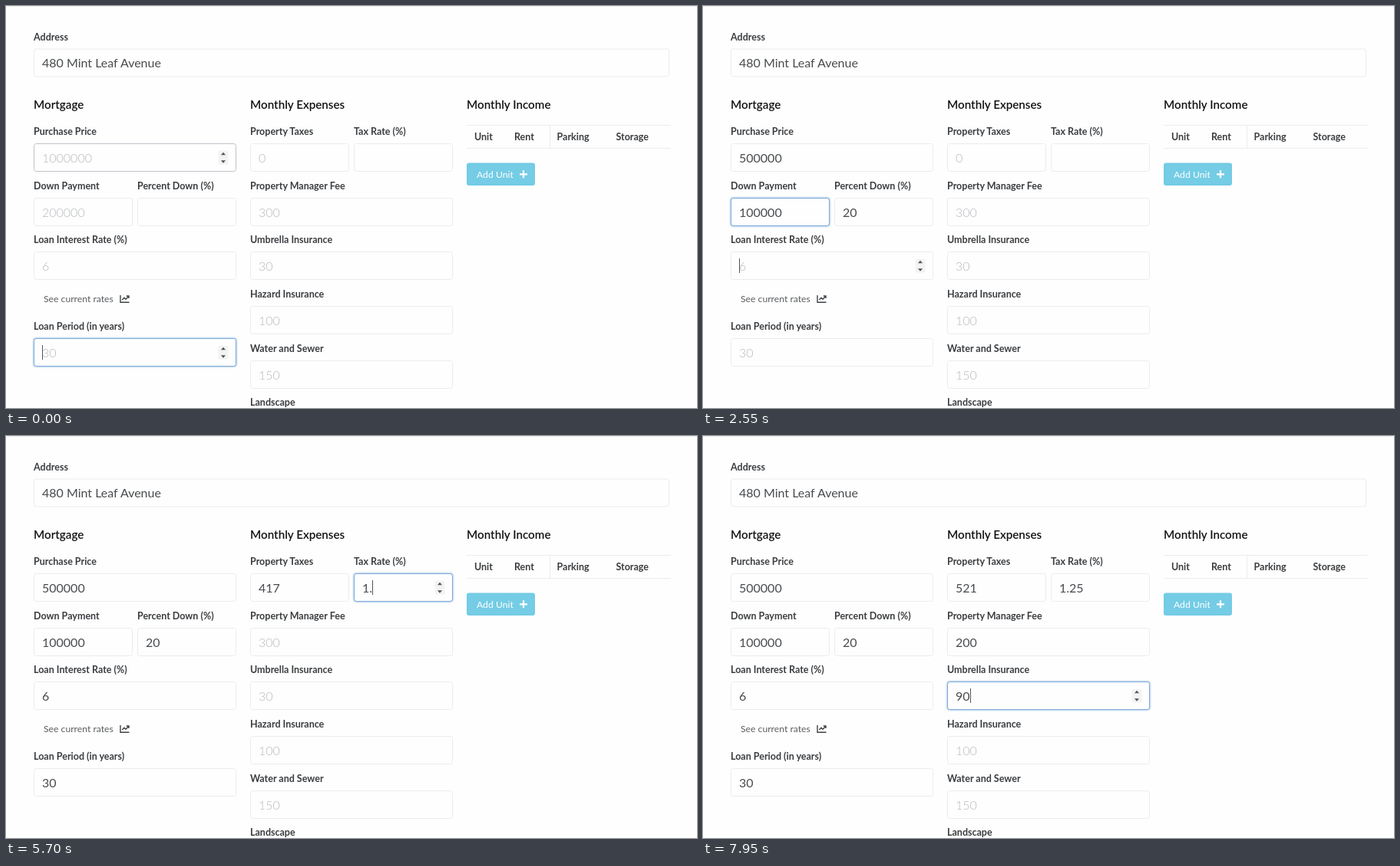
An HTML page that plays this animation: 900 px wide and 524 px high, repeating every 8 s.

```html
<!DOCTYPE html>
<html lang="en">
<head>
<meta charset="utf-8">
<title>Rental calculator form</title>
<style>
  html, body { margin: 0; width: 100%; height: 100%; overflow: hidden; background: #fefefe; }
  svg { display: block; font-family: Lato, sans-serif; }
  .heading { font-size: 15.2px; font-weight: 600; fill: #111; }
  .label { font-size: 12.5px; font-weight: 700; fill: #3a3d40; }
  .link { font-size: 12.2px; fill: #5a5d60; }
  .value { font-size: 16px; fill: #484b4e; }
  .hint { font-size: 16px; font-weight: 300; fill: #b4b7ba; }
  .box { fill: #fefefe; stroke: #ebecec; }
  .ring { fill: none; stroke: #7da8d6; }
  .halo { fill: none; stroke: #b4d1ee; stroke-opacity: .6; stroke-width: 2; }
  .rule { fill: none; stroke: #ebecec; }
</style>
</head>
<body>
<svg id="stage" width="900" height="524" viewBox="0 0 900 524"></svg>
<script>
const DURATION = 8000, FADE = 150, BLINK = 500;
const stage = document.getElementById('stage');

function add(tag, attrs, parent = stage) {
  const node = document.createElementNS('http://www.w3.org/2000/svg', tag);
  for (const key in attrs) node.setAttribute(key, attrs[key]);
  return parent.appendChild(node);
}

function write(text, x, y, cls, parent) {
  const node = add('text', { x, y, class: cls }, parent);
  node.textContent = text;
  return node;
}

function makeField(label, x, y, w, hint = '', typed = '', keys = []) {
  write(label, x, y - 10.7, 'label');
  const box = { x: x + .5, y: y + .5, width: w - 1, height: 36, rx: 3 };
  const frame = add('rect', { ...box, class: 'box' });
  const ring = add('g', { opacity: 0 });
  add('rect', { x: x - .5, y: y - .5, width: w + 1, height: 38, rx: 4, class: 'halo' }, ring);
  add('rect', { ...box, class: 'ring' }, ring);
  const text = write(hint, x + 11, y + 24.5, 'hint');
  const spinner = add('g', { transform: `translate(${x + w - 17} ${y + 18.7})` });
  add('rect', { x: -6.5, y: -9, width: 13, height: 18, rx: 2, fill: '#f3f3f3' }, spinner);
  add('path', { d: 'M-3-3.5L0-7L3-3.5ZM-3 3.5L0 7L3 3.5Z', fill: '#505356' }, spinner);
  const caret = add('rect', { x: x + 11, y: y + 9, width: 1, height: 19, fill: '#555' });
  return { x, hint, typed, keys, frame, ring, text, spinner, caret };
}

// Page furniture
add('rect', { width: 900, height: 1, fill: '#ececec' });
write('Mortgage', 36, 133.5, 'heading');
write('Monthly Expenses', 318, 133.5, 'heading');
write('Monthly Income', 600, 133.5, 'heading');

add('path', { d: 'M600 155.5H866M600 185.5H866M708.5 155V186', class: 'rule' });
[['Unit', 610], ['Rent', 662], ['Parking', 717.5], ['Storage', 794.5]]
  .forEach(([name, x]) => write(name, x, 175.2, 'label'));

add('rect', { x: 600, y: 204.5, width: 89, height: 29.5, rx: 3, fill: '#74cce5' });
write('Add Unit', 613, 223.8, 'link').style.fill = '#fff';
add('path', { d: 'M669 219.3H679M674 214.3V224.3', stroke: '#fff', 'stroke-width': 2.3 });

write('See current rates', 49, 386, 'link');
add('path', {
  d: 'M149 377V386.3H160.5M151.3 383L154 380.2L156 382.2L159.6 378.4M156.8 378H160V381',
  fill: 'none', stroke: '#3f4245', 'stroke-width': 1.4
});

// Form fields: label, x, y, width, placeholder, typed text, key times
const address = makeField('Address', 36, 55.5, 828);
const fields = {
  price: makeField('Purchase Price', 36, 179, 264, '1000000', '500000', [700, 800, 850, 900, 950, 1000]),
  down: makeField('Down Payment', 36, 250, 129, '200000', '100000', [2150, 2200, 2250, 2300, 2340, 2350]),
  percent: makeField('Percent Down (%)', 171, 250, 129),
  interest: makeField('Loan Interest Rate (%)', 36, 320, 264, '6', '6', [3150]),
  period: makeField('Loan Period (in years)', 36, 433, 264, '30', '30', [3950, 4150]),
  taxes: makeField('Property Taxes', 318, 179, 129, '0'),
  rate: makeField('Tax Rate (%)', 453, 179, 129, '', '1.25', [5650, 5700, 5800, 5850]),
  fee: makeField('Property Manager Fee', 318, 250, 264, '300', '200', [6700, 6750, 6850]),
  umbrella: makeField('Umbrella Insurance', 318, 320, 264, '30', '90', [7700, 7800]),
  hazard: makeField('Hazard Insurance', 318, 391, 264, '100'),
  water: makeField('Water and Sewer', 318, 462, 264, '150'),
  landscape: makeField('Landscape', 318, 532, 264)
};
setText(address, '480 Mint Leaf Avenue');
show(address.spinner, false);
show(address.caret, false);

const focusOrder = [
  [-400, 'period'], [50, 'price'], [1150, 'down'], [2550, 'interest'], [3200, 'link'],
  [3400, 'period'], [4500, 'taxes'], [4850, 'rate'], [6050, 'fee'], [7000, 'umbrella']
];

function setText(field, value) {
  field.text.textContent = value || field.hint;
  field.text.setAttribute('class', value ? 'value' : 'hint');
}

function show(node, visible) {
  node.setAttribute('visibility', visible ? 'visible' : 'hidden');
}

function valuesAt(t) {
  const values = {};
  for (const name in fields) {
    const { typed, keys } = fields[name];
    values[name] = typed.slice(0, keys.filter(time => time <= t).length);
  }
  const { price, down, rate } = values;
  if (down) values.percent = String(Math.round(down / price * 10000) / 100);
  if (rate) values.taxes = String(Math.round(price * rate / 1200));
  return values;
}

function render(t) {
  const current = focusOrder.findLastIndex(([time]) => time <= t);
  const [since, focused] = focusOrder[current];
  const previous = current > 0 ? focusOrder[current - 1][1] : null;
  const fade = Math.min(1, (t - since) / FADE);
  const values = valuesAt(t);

  for (const name in fields) {
    const field = fields[name], active = name === focused;
    setText(field, values[name]);
    field.ring.setAttribute('opacity', active ? fade : name === previous ? 1 - fade : 0);

    const hovered = name === 'price' && t < 50;
    field.frame.style.stroke = hovered ? '#bfc3c8' : '';
    show(field.spinner, active || hovered);

    const lastInput = Math.max(since, ...field.keys.filter(time => time <= t));
    show(field.caret, active && (t - lastInput) % (2 * BLINK) < BLINK);
    const width = values[name] ? field.text.getComputedTextLength() : 0;
    field.caret.setAttribute('x', Math.round(field.x + 11 + width));
  }
}

let start;
function tick(now) {
  start ??= now;
  render((now - start) % DURATION);
  requestAnimationFrame(tick);
}
render(0);
requestAnimationFrame(tick);
</script>
</body>
</html>
```
